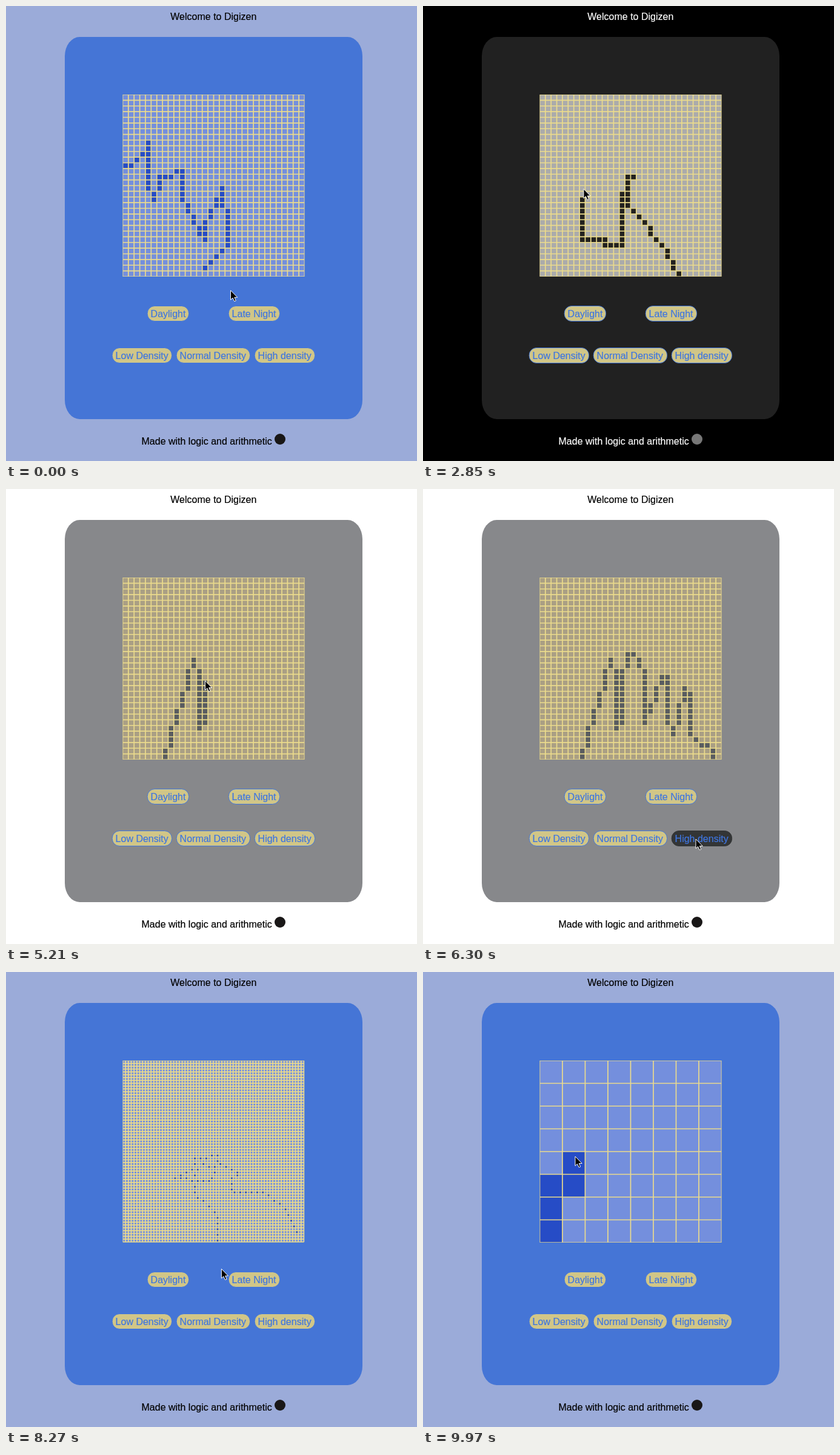
Recreate the animation shown at these times as an HTML page. Size 678x750 px, loop 10 s.

```html
<!DOCTYPE html>
<html lang="en">
<head>
<meta charset="utf-8">
<title>Welcome to Digizen</title>
<style>
  html, body { margin: 0; width: 100%; height: 100%; overflow: hidden; }
  svg { display: block; }
  #stage {
    width: 678px; height: 750px; background: var(--page);
    font: 16px "Liberation Sans", Arial, sans-serif;
  }
  .blue  { --page: #9babd9; --panel: #4575d6; --ink: #000; --cell: #748fdd; --paint: #264cc6; --icon: #191717; }
  .night { --page: #000; --panel: #212121; --ink: #fff; --cell: #ababab; --paint: #22211f; --icon: #777; }
  .day   { --page: #fff; --panel: #87888b; --ink: #000; --cell: #aa9f84; --paint: #595c60; --icon: #191717; }
  #panel { fill: var(--panel); }
  text { fill: var(--ink); stroke: var(--ink); stroke-width: .2; }
  #icon { fill: var(--icon); }
  #cells { fill: var(--cell); }
  #paint { fill: var(--paint); }
  #lines { fill: none; stroke: #ebdb8c; stroke-width: 1.7; }
  .button { --ink: #3f76e0; }
  .button rect { fill: #d1c687; stroke: #4075dc; }
  .button.hover rect { fill: #333536; stroke: #333536; }
  #cursor { fill: #000; stroke: #fff; stroke-linejoin: round; }
</style>
</head>
<body>
<svg id="stage" class="blue" viewBox="0 0 678 750">
  <rect id="panel" x="97" y="51" width="491" height="630" rx="24.5" ry="31.5"/>
  <text x="342.3" y="23" text-anchor="middle">Welcome to Digizen</text>
  <svg x="192.5" y="146" width="300" height="300">
    <rect id="cells"/>
    <path id="paint"/>
    <path id="lines"/>
  </svg>
  <g id="buttons"></g>
  <text x="223.5" y="723">Made with logic and arithmetic</text>
  <circle id="icon" cx="452" cy="714" r="9"/>
  <path id="cursor" d="M0 0V15.5L3.5 12.3L6.2 18L8.7 17L6.3 11.5H11.2Z"/>
</svg>
<script>
const LOOP = 10000;
const LEFT = 192.5, TOP = 146;
const $ = id => document.getElementById(id);

const buttons = [
  ["Daylight", 233, 494, 69], ["Late Night", 367, 494, 85],
  ["Low Density", 175, 563, 99], ["Normal Density", 281, 563, 122], ["High density", 410, 563, 100]
].map(([label, x, y, w]) => {
  const g = document.createElementNS("http://www.w3.org/2000/svg", "g");
  g.innerHTML = `<rect x="${x + .2}" y="${y + .5}" width="${w - .6}" height="25" rx="12"/>
    <text x="${x + 5.6}" y="${y + 19}">${label}</text>`;
  $("buttons").append(g);
  return { g, x, y, w };
});

// Each click clears the board and sets its theme and density.
const scenes = [
  { t: 0, theme: "blue", n: 32, size: 300 },
  { t: 1600, theme: "night", n: 32, size: 300 },
  { t: 4150, theme: "day", n: 32, size: 300 },
  { t: 6480, theme: "blue", n: 64, size: 299 },
  { t: 8850, theme: "blue", n: 8, size: 300 }
].map(s => ({ ...s, unit: s.size / s.n, marks: [] }));

const sceneAt = t => scenes.findLast(s => s.t <= Math.max(t, 0));
const mix = (a, b, k) => a + (b - a) * k;

const track = [];
const move = (t, x, y) => track.push({ t, x, y });

// Drag the pointer through key cells at an even pace, marking every stride-th cell.
function draw(t0, t1, stride, keys) {
  const { marks, unit } = sceneAt(t0);
  const points = keys.split(" ").map(k => k.split(",").map(Number));
  const spans = points.slice(1).map(([c, r], i) =>
    Math.max(Math.abs(c - points[i][0]), Math.abs(r - points[i][1])));
  const total = spans.reduce((a, b) => a + b);
  const time = step => mix(t0, t1, step / total);
  let step = 0;
  points.forEach(([c, r], i) => {
    move(time(step), LEFT + (c + .5) * unit, TOP + (r + .5) * unit);
    const span = spans[i] ?? 1, [c2, r2] = points[i + 1] ?? [c, r];
    for (let j = 0; j < span; j++, step++)
      if (step % stride === 0)
        marks.push({ t: time(step), c: Math.round(mix(c, c2, j / span)), r: Math.round(mix(r, r2, j / span)) });
  });
}

// Left on the board before the loop begins
draw(-900, -100, 1, "0,12 1,12 3,10 4,8 4,16 5,18 6,14 10,13 10,18 14,25 14,22 17,16 17,19 18,20 18,26 14,30");

move(0, 370, 469);
draw(130, 370, 1, "26,31 31,27 31,19 27,15");
draw(380, 560, 3, "23,12 19,9 16,8 9,8");
draw(570, 1190, 1, "8,9 6,10 6,15 16,15 16,14 18,13 22,13 23,18 20,22 17,21 16,15 18,12 21,12 25,14 27,19 23,26 22,31");
move(1210, 406.5, 444.5);
move(1400, 409, 505);
move(2000, 409, 505);

draw(2130, 2820, 1, "24,31 22,28 21,26 16,20 15,19 15,14 16,14 14,17 14,26 11,26 11,25 7,25 7,18");
move(2850, 265, 302);
draw(2890, 3820, 1, "7,14 1,4 8,2 22,8 14,15 7,25 7,31");
move(3960, 262, 499);
move(4550, 262, 499);

draw(4680, 6030, 1, "7,31 9,24 12,14 13,17 13,26 14,25 14,17 15,13 16,13 18,17 18,25 21,17 22,17 22,25 23,27 25,19 26,20 26,27 30,30 30,31");
move(6180, 487, 698);
move(6295, 450, 577);
move(6950, 450, 577);

draw(7120, 8200, 2, "61,60 56,51 49,46 38,46 38,41 41,39 33,36 33,33 25,34 24,38 17,41 31,42 32,37 28,36 24,41 25,47 28,49 33,54 33,63");
move(8270, 356, 489);
move(8480, 224, 574);
move(9600, 224, 574);

draw(9750, 9950, 1, "0,7 0,5 1,5 1,4");
move(9968, 251, 304);
move(LOOP, 251, 304);

function cursorAt(t) {
  const i = track.findIndex(p => p.t > t), a = track[i - 1], b = track[i];
  const k = (t - a.t) / (b.t - a.t);
  return { x: mix(a.x, b.x, k), y: mix(a.y, b.y, k) };
}

let shown;
function showScene(scene) {
  if (scene === shown) return;
  shown = scene;
  const { n, size, unit } = scene;
  $("stage").setAttribute("class", scene.theme);
  $("cells").setAttribute("width", size);
  $("cells").setAttribute("height", size);
  let d = "";
  for (let i = 0; i <= n; i++) d += `M${i * unit} 0V${size}M0 ${i * unit}H${size}`;
  $("lines").setAttribute("d", d);
}

function render(t) {
  const scene = sceneAt(t), { unit } = scene;
  showScene(scene);
  $("paint").setAttribute("d", scene.marks.filter(m => m.t <= t).map(({ c, r }) =>
    `M${c * unit} ${r * unit}h${unit}v${unit}h${-unit}z`).join(""));
  const { x, y } = cursorAt(t);
  $("cursor").setAttribute("transform", `translate(${x} ${y})`);
  for (const b of buttons) {
    const hover = x >= b.x && x <= b.x + b.w && y >= b.y && y <= b.y + 26;
    b.g.setAttribute("class", hover ? "button hover" : "button");
  }
}

const start = performance.now();
function tick() {
  render((performance.now() - start) % LOOP);
  requestAnimationFrame(tick);
}
tick();
</script>
</body>
</html>
```
